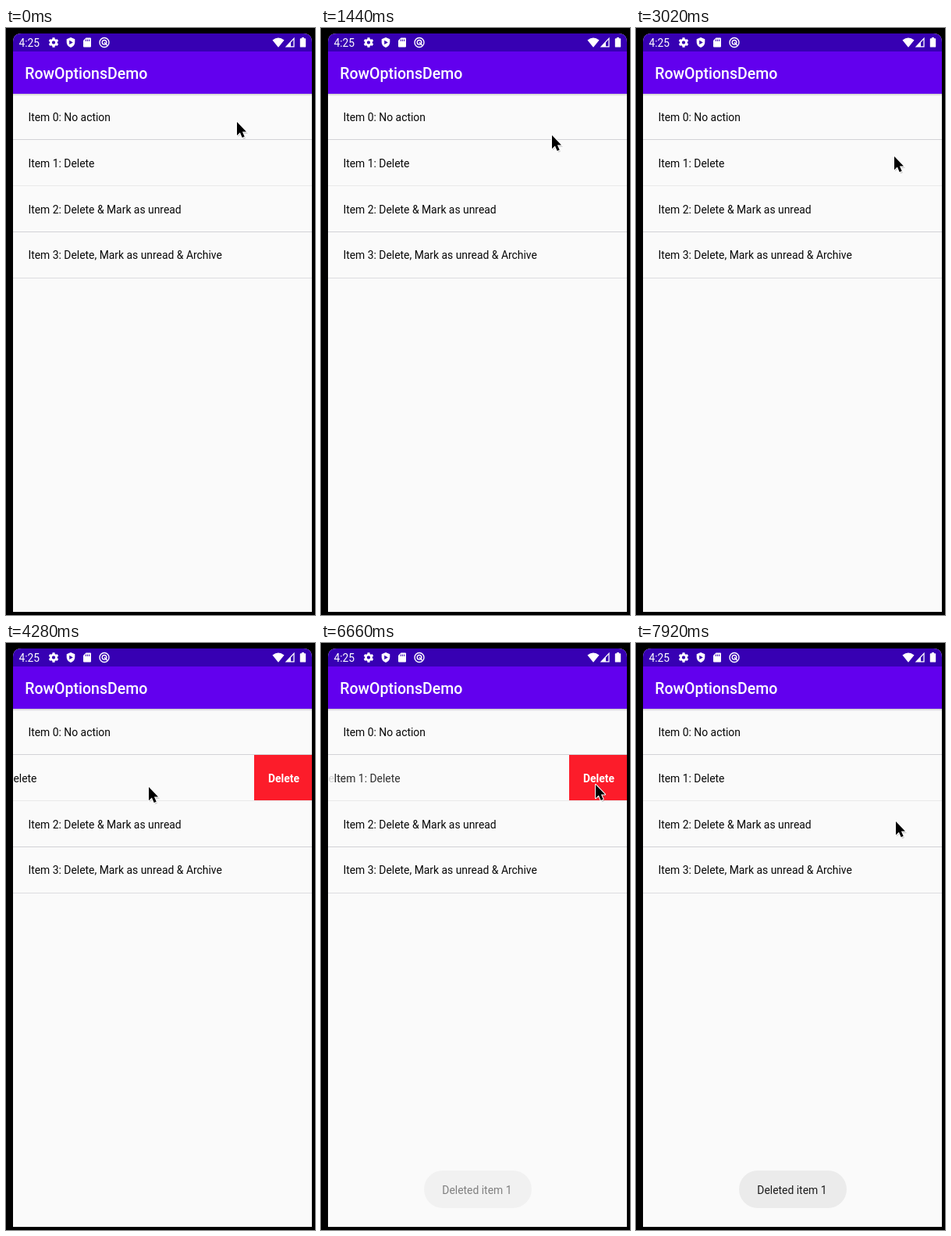
Recreate the animation shown at these times as an HTML page. Size 396x750 px, loop 8000 ms.

```html
<!DOCTYPE html>
<html lang="en">
<head>
<meta charset="utf-8">
<title>Row options demo</title>
<style>
  html, body { margin: 0; width: 100%; height: 100%; overflow: hidden; background: #000; }
  svg { display: block; width: 100vw; height: 100vh; }
  text { font-family: Roboto, "Noto Sans", sans-serif; font-size: 13.9px; fill: #080808; }
  .clock { font-size: 13.8px; fill: #fff; }
  .title { font-size: 19.5px; font-weight: 500; fill: #fff; }
  .button { font-weight: 700; fill: #fff; text-anchor: middle; }
  .note { fill: #1c1c1c; }
</style>
</head>
<body>
<svg viewBox="0 0 396 750">
  <defs>
    <clipPath id="screen"><path d="M9 746V18Q9 7 20 7H381Q392 7 392 18V746Z"/></clipPath>
    <clipPath id="reveal"><rect id="revealBox" y="142" height="60"/></clipPath>
    <linearGradient id="shade" x2="0" y2="1">
      <stop stop-opacity=".2"/>
      <stop offset="1" stop-opacity="0"/>
    </linearGradient>
  </defs>
  <rect width="396" height="750"/>
  <g clip-path="url(#screen)">
    <rect x="9" y="6" width="383" height="740" fill="#fafafa"/>
    <g id="rows"></g>
    <text id="oldText" x="-45.6" y="178">Item 1: Delete</text>
    <g clip-path="url(#reveal)">
      <rect x="318" y="143" width="74" height="58" fill="#fc1c2a"/>
      <text class="button" x="356" y="178">Delete</text>
    </g>
    <rect x="9" y="84" width="383" height="3" fill="url(#shade)"/>
    <rect x="9" y="6" width="383" height="24" fill="#3700b3"/>
    <rect x="9" y="30" width="383" height="54" fill="#6200ee"/>
    <text class="clock" x="16.5" y="23.5">4:25</text>
    <text class="title" x="24.3" y="65">RowOptionsDemo</text>

    <g fill="#fff">
      <g id="gear" transform="translate(61 18.5)"></g>
      <path d="M83 12L88.3 14.2V18Q88.3 23 83 25Q77.7 23 77.7 18V14.2Z"/>
      <path d="M81.2 15.8V21L85.8 18.4Z" fill="#3700b3"/>
      <path d="M102.5 12.5H108Q109 12.5 109 13.5V23.5Q109 24.5 108 24.5H100Q99 24.5 99 23.5V16Z"/>
      <path d="M102.4 14.5V17M104.6 14.5V17M106.8 14.5V17" stroke="#3700b3"/>
      <g fill="none" stroke="#fff" stroke-width="1.4">
        <circle cx="126" cy="18.5" r="6"/>
        <circle cx="126" cy="18.3" r="2.8"/>
        <path d="M126 18.3L130 22.6"/>
      </g>
      <path d="M341.5 15.5Q349 9.5 356.5 15.5L349 24.8Z"/>
      <path d="M359.2 23.8H369V13.4Z" fill="none" stroke="#fff" stroke-width="1.3"/>
      <path d="M359 24L365 17.8V24Z"/>
      <path d="M379 12H382V13.2H383.4Q384.2 13.2 384.2 14V23.7Q384.2 24.6 383.4 24.6H377.6Q376.8 24.6 376.8 23.7V14Q376.8 13.2 377.6 13.2H379Z"/>
    </g>

    <g id="toast">
      <rect x="132" y="674" width="138" height="48" rx="24" fill="#ebebeb"/>
      <text class="note" x="155.3" y="704">Deleted item 1</text>
    </g>
  </g>
  <g id="cursor">
    <path d="M1 2V19L5 16L8 22L11 21L8.5 15H14Z" fill="#555" opacity=".25"/>
    <path d="M0 0V17.2L3.9 13.6L6.7 20L9.7 18.7L6.9 12.4H12Z"
      stroke="#fff" stroke-width="2" paint-order="stroke" stroke-linejoin="round"/>
  </g>
</svg>
<script>
const LOOP = 8000;
const OPEN = 74;
const el = id => document.getElementById(id);
const clamp = v => Math.max(0, Math.min(1, v));
const ease = v => v * v * (3 - 2 * v);
const slowDown = v => 1 - (1 - v) ** 2;
const ramp = (t, from, to) => clamp((t - from) / (to - from));

// time, x, y of the pointer tip
const path = [
  [0, 296, 120], [1000, 296, 137], [2000, 296, 137], [2880, 331, 164],
  [3140, 331, 164], [3500, 350, 174], [3660, 350, 174], [4180, 183, 184],
  [4480, 183, 184], [5200, 352, 181], [6720, 352, 181], [7000, 331, 200],
  [7500, 331, 226], [7880, 333, 228]
];

const labels = ["No action", "Delete", "Delete & Mark as unread", "Delete, Mark as unread & Archive"];
const lines = ["#d2d2d6", "#e9e9e9", "#d2d2d6", "#dcdce0"];

function make(tag, attrs, parent) {
  const node = document.createElementNS("http://www.w3.org/2000/svg", tag);
  for (const key in attrs) node.setAttribute(key, attrs[key]);
  return parent.appendChild(node);
}

const rows = labels.map((label, i) => {
  const text = make("text", { x: 28.4, y: 119 + i * 58.8 }, el("rows"));
  text.textContent = `Item ${i}: ${label}`;
  make("rect", { x: 9, y: 142 + i * 59, width: 383, height: 1, fill: lines[i] }, el("rows"));
  return text;
});

for (let a = 0; a < 360; a += 60) {
  make("rect", { x: -1.6, y: -6.3, width: 3.2, height: 4, rx: .5, transform: `rotate(${a})` }, el("gear"));
}
make("circle", { r: 3.5, fill: "none", stroke: "#fff", "stroke-width": 2.6 }, el("gear"));

function pointAt(t) {
  const next = path.findIndex(p => p[0] > t);
  if (next < 0) return path[path.length - 1].slice(1);
  const [a, b] = [path[next - 1], path[next]];
  const k = ease(ramp(t, a[0], b[0]));
  return [a[1] + (b[1] - a[1]) * k, a[2] + (b[2] - a[2]) * k];
}

// Evenly spaced poses are held for 20, 20 and 100 ms in turn.
function heldTime(t) {
  const beat = Math.floor((t - 40) / 140);
  const phase = t - 40 - beat * 140;
  const step = phase < 20 ? 0 : phase < 40 ? 1 : 2;
  return Math.max(0, beat * 140 + 40 + step * 20 + (step ? 0 : 0));
}

function draw(time) {
  const t = heldTime(time);
  const [x, y] = pointAt(t);
  el("cursor").setAttribute("transform", `translate(${x} ${y})`);

  const closing = t >= 6510;
  const back = slowDown(ramp(t, 6510, 6760));
  const drag = t < 3660 ? 0 : t > 4180 ? OPEN : Math.min(OPEN, 350 - x);
  const shift = closing ? OPEN * (1 - back) : drag;
  rows[1].setAttribute("x", 28.4 - shift);
  rows[1].setAttribute("opacity", closing ? back : 1);
  el("oldText").setAttribute("opacity", closing ? 1 - back : 0);

  const shown = t >= 6760 ? 0 : closing ? OPEN : shift;
  el("revealBox").setAttribute("x", 392 - shown);
  el("revealBox").setAttribute("width", shown);
  el("toast").setAttribute("opacity", ramp(t, 6550, 6750));
}

const start = performance.now();
function tick() {
  draw((performance.now() - start) % LOOP);
  requestAnimationFrame(tick);
}
draw(0);
requestAnimationFrame(tick);
</script>
</body>
</html>
```
